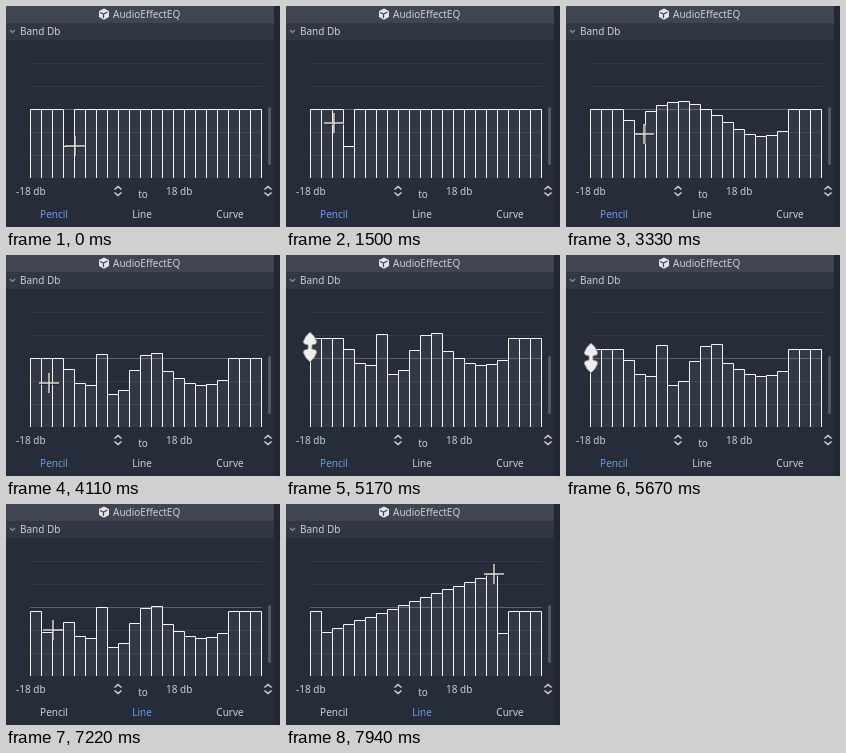
Animation of 274 by 221 pixels, one loop 8 s. Source, as an HTML page:

```html
<!DOCTYPE html>
<html lang="en">
<head>
<meta charset="utf-8">
<title>Band editor</title>
<style>
  html, body { margin: 0; height: 100%; overflow: hidden; background: #262c3a; }
  svg { display: block; width: 274px; height: 221px; }
  text { font: 10px "Noto Sans", "Open Sans", sans-serif; fill: #cdcfd4; }
  .mid { text-anchor: middle; }
  .on { fill: #699ce8; }
  .chevron { fill: none; stroke: #d2d4d9; stroke-width: 1.5; }
  .dim { stroke: #8d919c; stroke-width: 1.2; }
</style>
</head>
<body>
<svg viewBox="0 0 274 221">
  <rect width="274" height="221" fill="#262c3a"/>
  <rect width="268" height="17" fill="#414553"/>
  <rect y="17" width="268" height="17" fill="#303745"/>
  <rect x="268" width="6" height="221" fill="#222733"/>

  <path d="M98 2.5l5 2.500v6l-5 2.700-5-2.700V5z" fill="#e4e5e8"/>
  <path d="M94 6.500l3.500 1.500 4-2M97.500 8v4" fill="none" stroke="#414553" stroke-width="1.200"/>
  <text x="107" y="12">AudioEffectEQ</text>
  <path d="M4 24l2.500 2.500L9 24" class="chevron dim"/>
  <text x="14" y="29">Band Db</text>

  <path id="fills" fill="#fff" fill-opacity=".06"/>
  <path d="M24 57.500H256M24 80.500H256M24 126.500H256M24 149.500H256" stroke="#fff" stroke-opacity=".07"/>
  <path d="M24 103.500H256" stroke="#fff" stroke-opacity=".25"/>
  <path id="outlines" fill="none" stroke="#f4f5f7"/>
  <rect x="262" y="101" width="3" height="58" rx="1.500" fill="#535866"/>

  <text x="10" y="189">-18 db</text>
  <text x="137" y="192" class="mid">to</text>
  <text x="160" y="189">18 db</text>
  <g class="chevron">
    <path id="spinner" d="M108.500 183.500l3.500-3 3.500 3M108.500 186.500l3.500 3 3.500-3"/>
    <use href="#spinner" x="150"/>
  </g>
  <text id="pencil" x="48" y="212" class="mid">Pencil</text>
  <text id="line" x="136" y="212" class="mid">Line</text>
  <text x="224" y="212" class="mid">Curve</text>

  <g id="cross">
    <path d="M-9 1H10M1-9V10" stroke="#151821" stroke-opacity=".5" stroke-width="2"/>
    <path d="M-10 0H10M0-10V10" stroke="#ddd7cb" stroke-width="1.500"/>
  </g>
  <path id="resize" d="M0-15Q5-11 7-5Q6-2 2-2V2Q6 2 7 5Q5 11 0 15Q-5 11-7 5Q-6 2-2 2V-2Q-6-2-7-5Q-5-11 0-15z" fill="#eee" stroke="#777a82" stroke-width=".8"/>
  <g id="hand" stroke-width="1.500">
    <path d="M-3 0Q-1-3 1 0L4 7 12 8Q15 9 15 13L14 21Q9 23 4 22L-3 15Q-4 12-2 11L1 12z" fill="#f7f7f7" stroke="#08090c"/>
    <path d="M5 13l2-1v7M5 19h5M11 12v7" fill="none" stroke="#3f9fd8"/>
  </g>
</svg>
<script>
const LOOP = 8000, LEFT = 24, BASE = 172, COUNT = 21, STEP = 231.9 / COUNT, ZERO = 103;
const $ = id => document.getElementById(id);
const mix = (a, b, k) => a + (b - a) * k;
const progress = (t, start, end) => Math.min(1, Math.max(0, (t - start) / (end - start)));
const edge = bar => LEFT + STEP * bar;
const barAt = x => Math.floor((x - LEFT) / STEP);

const move = (start, end, x, y) => ({ start, end, x, y });
// A stroke draws shape(u) while u runs from one bar edge to another
const stroke = (start, end, from, to, shape) =>
  ({ start, end, from, to, shape, x: edge(to), y: shape(to) });

const rise = u => 114 - 53 * (Math.max(0, u - 4) / 13) ** 1.35;
const wave = u => 112.5 + 17.5 * Math.cos(Math.PI * (u - 15.2) / 7.5);
const ramp = u => 118 + 2 * u;
const climb = u => 98 + 41 / (1 + Math.exp(2.6 * (u - 9.85)));

const gestures = [
  move(330, 390, 76, 143),
  move(560, 1060, 52, 127),
  move(1280, 1500, 48, 117),
  move(1500, 1600, 57, 114),
  stroke(1600, 2640, 3, 17, rise),
  move(2640, 2665, 219, 58),
  move(2665, 2700, 219, 122),
  stroke(2700, 3300, 17.7, 4, wave),
  stroke(3300, 3370, 4, 6, ramp),
  move(3370, 3440, 101, 139),
  stroke(3440, 3660, 7, 12, climb),
  move(3780, 4110, 43, 128),
  move(4110, 4330, 21, 97),
  move(5060, 5170, 24, 92),
  move(5170, 5350, 24, 83),
  move(5350, 5830, 25, 113),
  move(5890, 6220, 139, 198),
  move(6780, 7200, 41, 128),
  move(7200, 7560, 144, 96),
  move(7560, 7940, 208, 70)
];

function drawBars(levels, { from, to, shape }, k) {
  const u = mix(from, to, k), right = to > from;
  for (let i = Math.floor(Math.min(from, u)); i < Math.max(from, u); i++) {
    levels[i] = shape(right ? Math.min(u, i + 1) : Math.max(u, i));
  }
}

function shiftAt(t, y) {
  if (t < 5060) return 22 * progress(t, 4670, 4890);
  if (t < 5170) return mix(22, -20, progress(t, 5060, 5170));
  return t < 6220 ? Math.min(4, y - 112) : 4;
}

function stateAt(t) {
  let x = 69, y = 140;
  let levels = Array(COUNT).fill(ZERO);
  levels[3] = 140;
  for (const g of gestures) {
    if (t < g.start) break;
    const k = progress(t, g.start, g.end);
    if (g.shape) {
      const u = mix(g.from, g.to, k);
      drawBars(levels, g, k);
      [x, y] = [edge(u), g.shape(u)];
    } else {
      [x, y] = [mix(x, g.x, k), mix(y, g.y, k)];
    }
  }
  levels = levels.map(level => level + shiftAt(t, y));
  if (t >= 7200) {
    const last = barAt(x);
    for (let i = 1; i <= last; i++) levels[i] = mix(128, y, (i - 1) / Math.max(1, last - 1));
  }
  return { x, y, levels };
}

function draw(t) {
  const { x, y, levels } = stateAt(t);
  const path = levels.map((level, i) => {
    const [l, r] = [i, i + 1].map(n => Math.floor(edge(n)) + .5);
    return `M${l} ${BASE}V${Math.round(level) + .5}H${r}V${BASE}`;
  }).join("");
  $("fills").setAttribute("d", path);
  $("outlines").setAttribute("d", path);

  const shape = t >= 4250 && t < 5920 ? "resize" : t >= 5920 && y > BASE ? "hand" : "cross";
  for (const id of ["cross", "resize", "hand"]) {
    $(id).style.display = id === shape ? "" : "none";
  }
  $(shape).setAttribute("transform", `translate(${Math.round(x)} ${Math.round(y)})`);
  $("pencil").classList.toggle("on", t < 6780);
  $("line").classList.toggle("on", t >= 6560);
}

const began = performance.now();
function tick() {
  draw((performance.now() - began) % LOOP);
  requestAnimationFrame(tick);
}
tick();
</script>
</body>
</html>
```
